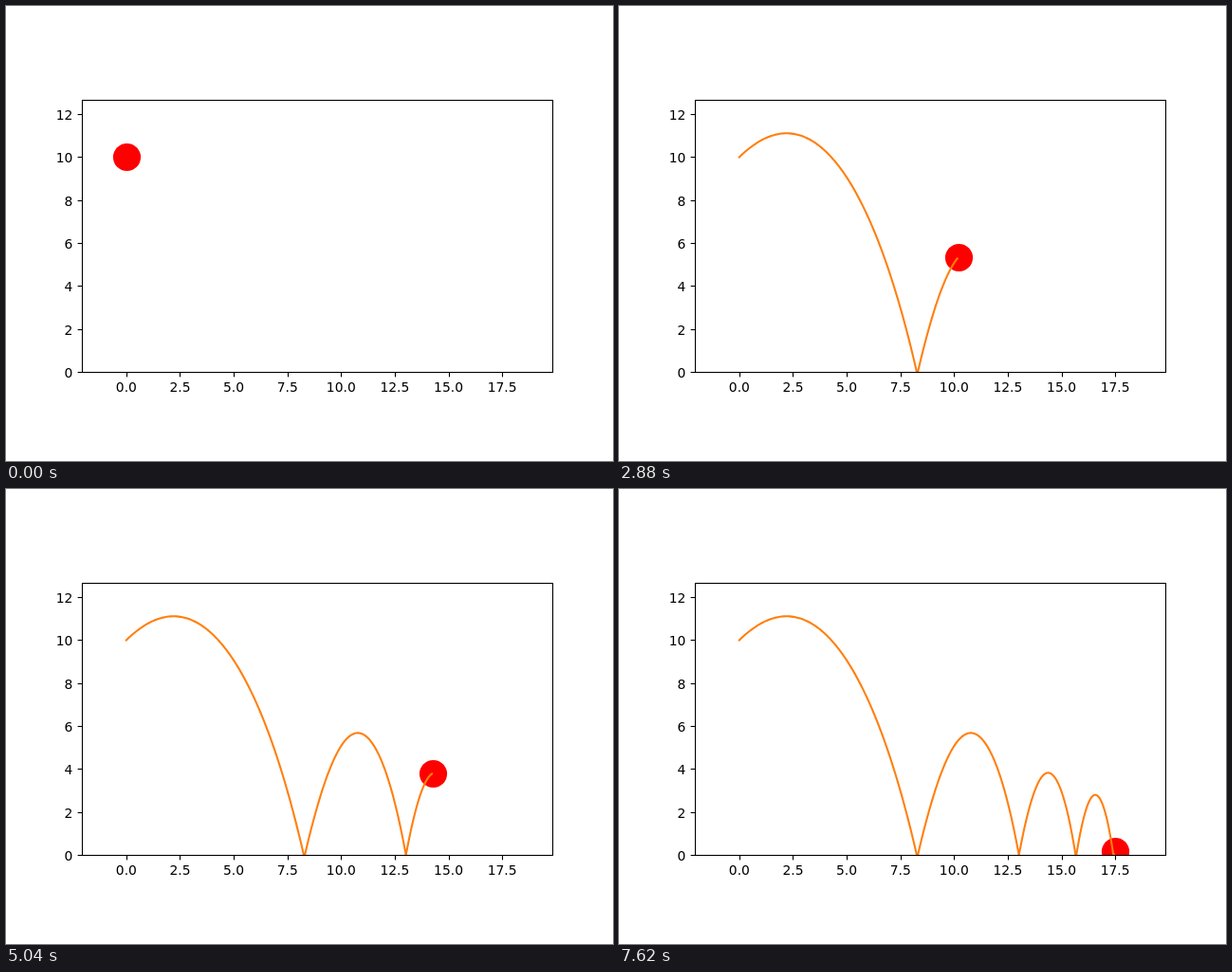
Recreate the animation shown at these times as an HTML page with a canvas. Size 640 by 480 pixels, loop 7640 ms.

```html
<!DOCTYPE html>
<html>
<head>
<meta charset="utf-8">
<style>
html, body { margin: 0; width: 640px; height: 480px; overflow: hidden; background: #fff; }
canvas { display: block; }
</style>
</head>
<body>
<canvas id="stage" width="640" height="480"></canvas>
<script>
const ctx = document.getElementById('stage').getContext('2d');
const STEPS = 382, STEP_MS = 20;
const SCALE = 22.645, X0 = 126.85, Y0 = 385.9;
const BOX = { left: 80, top: 99, right: 576, bottom: 386 };
const px = x => X0 + x * SCALE;
const py = y => Y0 - y * SCALE;
const snap = v => Math.round(v) + 0.5;

// Thrown ball with quadratic air drag and an elastic floor.
function simulate() {
  const g = 9.81, drag = 0.03618, dt = 0.02;
  let x = 0, y = 10, vx = 7 * Math.SQRT1_2, vy = vx;
  const path = [];
  for (let i = 0; i < STEPS; i++) {
    path.push([px(x), py(y)]);
    const k = drag * Math.hypot(vx, vy);
    vx -= k * vx * dt;
    vy -= (g + k * vy) * dt;
    x += vx * dt;
    y += vy * dt;
    if (y < 0 && vy < 0) vy = -vy;
  }
  return path;
}
const path = simulate();

function line(x1, y1, x2, y2) {
  ctx.beginPath();
  ctx.moveTo(x1, y1);
  ctx.lineTo(x2, y2);
  ctx.stroke();
}

function drawAxes() {
  const { left, top, right, bottom } = BOX;
  ctx.strokeStyle = ctx.fillStyle = '#000';
  ctx.lineWidth = 1.11;
  ctx.lineCap = 'butt';
  ctx.font = '13.889px "DejaVu Sans", sans-serif';
  ctx.textAlign = 'center';
  for (let v = 0; v <= 17.5; v += 2.5) {
    const x = snap(px(v));
    line(x, bottom + 0.5, x, bottom + 5.4);
    ctx.fillText(v.toFixed(1), px(v), 407);
  }
  ctx.textAlign = 'right';
  for (let v = 0; v <= 12; v += 2) {
    const y = snap(py(v));
    line(left + 0.5, y, left - 4.4, y);
    ctx.fillText(v, 70.3, y + 5);
  }
  ctx.strokeRect(left + 0.5, top + 0.5, right - left, bottom - top);
}

function draw(n) {
  ctx.fillStyle = '#fff';
  ctx.fillRect(0, 0, 640, 480);

  ctx.save();
  ctx.beginPath();
  ctx.rect(BOX.left, BOX.top, BOX.right - BOX.left, BOX.bottom - BOX.top);
  ctx.clip();
  ctx.fillStyle = '#f00';
  ctx.beginPath();
  ctx.arc(snap(path[n][0]), snap(path[n][1]), 14.58, 0, 2 * Math.PI);
  ctx.fill();
  // The trail ends one step behind the ball.
  if (n > 1) {
    ctx.strokeStyle = '#ff7f0e';
    ctx.lineWidth = 2.083;
    ctx.lineCap = 'square';
    ctx.lineJoin = 'round';
    ctx.beginPath();
    path.slice(0, n).forEach(p => ctx.lineTo(...p));
    ctx.stroke();
  }
  ctx.restore();
  drawAxes();
}

const start = performance.now();
function tick() {
  const t = Math.max(0, performance.now() - start);
  draw(Math.floor(t / STEP_MS) % STEPS);
  requestAnimationFrame(tick);
}
tick();
</script>
</body>
</html>
```
